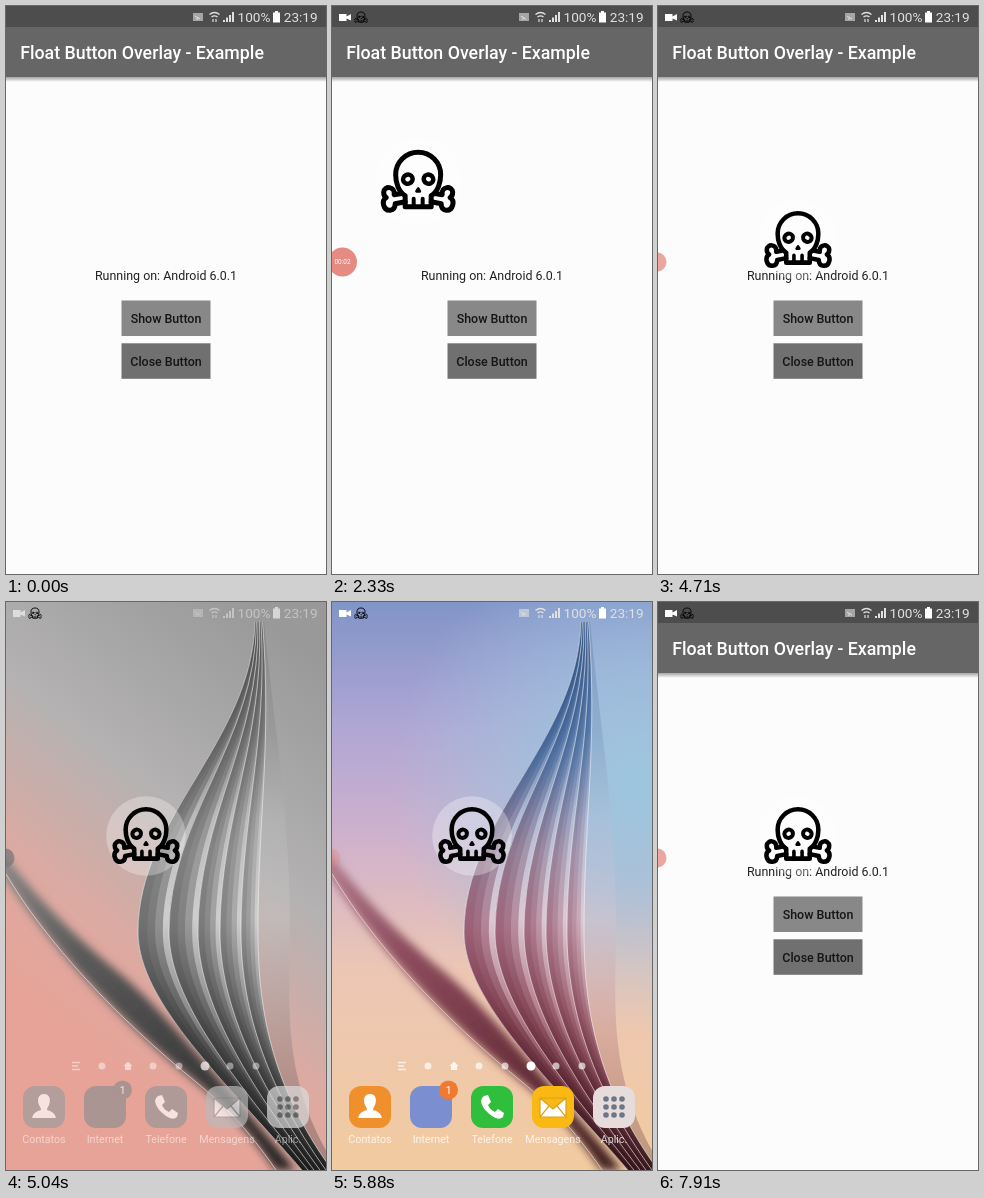
An HTML page that plays this animation: 320x568 px, repeating every 8000 ms.

```html
<!DOCTYPE html>
<html lang="en">
<head>
<meta charset="utf-8">
<title>Float button overlay</title>
<style>
  html, body { margin: 0; width: 100%; height: 100%; overflow: hidden; background: #000; }
  svg { display: block; width: 320px; height: 568px; font-family: Roboto, sans-serif; }
  .mid { text-anchor: middle; }
  .medium { font-weight: 500; }
</style>
</head>
<body>
<svg viewBox="0 0 320 568">
  <defs>
    <linearGradient id="sky" x2="0" y2="1">
      <stop offset="0" stop-color="#8194c8"/><stop offset=".22" stop-color="#b0a6d4"/>
      <stop offset=".42" stop-color="#d0b2cc"/><stop offset=".65" stop-color="#ecc6b4"/>
      <stop offset="1" stop-color="#f2cba0"/>
    </linearGradient>
    <radialGradient id="glow" gradientUnits="userSpaceOnUse" cx="310" cy="180" r="250">
      <stop offset="0" stop-color="#9cc6de"/><stop offset=".4" stop-color="#9cc4de" stop-opacity=".75"/>
      <stop offset="1" stop-color="#a4c4e0" stop-opacity="0"/>
    </radialGradient>
    <linearGradient id="dusk" gradientUnits="userSpaceOnUse" x1="320" y1="60" x2="40" y2="420">
      <stop offset="0" stop-color="#999"/><stop offset=".45" stop-color="#b4b2b2"/>
      <stop offset=".75" stop-color="#dcaaa2"/><stop offset="1" stop-color="#e8a398"/>
    </linearGradient>
    <linearGradient id="petal" gradientUnits="userSpaceOnUse" x1="0" y1="20" x2="0" y2="568">
      <stop offset="0" stop-color="#456796"/><stop offset=".2" stop-color="#6486b2"/>
      <stop offset=".36" stop-color="#b4bcd6"/><stop offset=".54" stop-color="#dcc8d4"/>
      <stop offset=".7" stop-color="#b88290"/><stop offset=".84" stop-color="#824452"/>
      <stop offset="1" stop-color="#421e24"/>
    </linearGradient>
    <linearGradient id="shade" gradientUnits="userSpaceOnUse" x1="0" y1="20" x2="0" y2="568">
      <stop offset="0" stop-color="#2c4c7e"/><stop offset=".25" stop-color="#48689a"/>
      <stop offset=".42" stop-color="#8a7088"/><stop offset=".56" stop-color="#985a70"/>
      <stop offset=".75" stop-color="#6e3040"/><stop offset="1" stop-color="#2e1216"/>
    </linearGradient>
    <linearGradient id="ribbon" gradientUnits="userSpaceOnUse" x1="0" y1="250" x2="270" y2="568">
      <stop offset="0" stop-color="#b07a8c"/><stop offset=".3" stop-color="#8c4c5e"/>
      <stop offset=".65" stop-color="#6e3340"/><stop offset="1" stop-color="#3a1a1c"/>
    </linearGradient>
    <linearGradient id="shadow" x2="0" y2="1">
      <stop offset="0" stop-opacity=".35"/><stop offset="1" stop-opacity="0"/>
    </linearGradient>
    <filter id="soft"><feGaussianBlur stdDeviation="4"/></filter>
    <g id="skull" fill="none" stroke="#000" stroke-width="5" stroke-linejoin="round" stroke-linecap="round">
      <path d="M-13 25V14C-20 10-22.5 0-22.5-7A22.5 22.5 0 0 1 22.5-7C22.5 0 20 10 13 14V25Z"/>
      <path d="M-4.5 17V25M4.5 17V25" stroke-width="4"/>
      <ellipse cx="-10.3" cy="-2.5" rx="4.8" ry="4.5" stroke-width="4.500" transform="rotate(-25 -10.3 -2.5)"/>
      <ellipse cx="10.3" cy="-2.5" rx="4.8" ry="4.5" stroke-width="4.500" transform="rotate(25 10.3 -2.5)"/>
      <path d="M0 7L-1.5 9.5H1.5Z" stroke-width="3"/>
      <path id="bone" d="M-18 12L-24 13C-23 4-34 4-34.5 10.5C-34.5 13-33.5 15-32 16C-37 19-35 29-28 28.5C-24 28-23 25-23 22L-13 20"/>
      <use href="#bone" transform="scale(-1 1)"/>
    </g>
  </defs>

  <g id="home">
    <g id="colorSky">
      <rect width="320" height="568" fill="url(#sky)"/>
      <rect width="320" height="568" fill="url(#glow)"/>
    </g>
    <rect id="greySky" width="320" height="568" fill="url(#dusk)"/>
    <g id="leaves">
      <path d="M-10 242C30 296 70 335 105 364C150 400 190 450 290 568H270C240 525 220 505 190 480C110 415 40 340-10 262Z" fill="url(#ribbon)" filter="url(#soft)"/>
      <path d="M0 272C40 340 110 415 190 480C220 505 240 525 270 568" fill="none" stroke="#f6e0d4" stroke-opacity=".7"/>
    </g>
    <g id="icons" fill="#fff">
      <path d="M66 460.5H74M66 464H72M66 467.5H74" stroke="#fff" stroke-opacity=".7" stroke-width="1.5"/>
      <path d="M117.500 464L122 459.500L126.500 464H125V468H119V464Z" opacity=".8"/>
    </g>
  </g>

  <g id="app">
    <rect id="page" width="320" height="568"/>
    <rect y="71" width="320" height="5" fill="url(#shadow)"/>
    <rect width="320" height="71" fill="#666"/>
    <rect width="320" height="21" fill="#4d4d4d"/>
    <text class="medium" x="14.200" y="52.500" font-size="17.780" fill="#fff">Float Button Overlay - Example</text>
    <text class="mid" x="160" y="274.300" font-size="12.440" fill="#222">Running on: Android 6.0.1</text>
    <rect x="115.500" y="294.500" width="89" height="35.500" fill="#888"/>
    <rect x="115.500" y="337.300" width="89" height="35.500" fill="#707070"/>
    <g class="mid medium" font-size="12.440" fill="#151515">
      <text x="160" y="317">Show Button</text>
      <text x="160" y="359.700">Close Button</text>
    </g>
  </g>

  <g id="status" fill="#e0e0e0" font-size="13.600">
    <path d="M187 7H197V15H187Z" opacity=".6"/>
    <path d="M189 10L194 13M190 13H192" stroke="#e0e0e0"/>
    <g fill="none" stroke="#e0e0e0" stroke-width="1.400">
      <path d="M203.500 8.500Q208.500 4.500 213.500 8.500M205.500 11Q208.500 8.700 211.500 11"/>
      <path d="M207 13V16M210 16V13" stroke-width="1.200"/>
    </g>
    <path d="M217 14H219V16H217ZM220 11.500H222V16H220ZM223 9H225V16H223ZM226 6H228V16H226Z"/>
    <text x="231.500" y="16">100%</text>
    <path d="M269 5H272V6.500H274V16.500H267V6.500H269Z" fill="#fff"/>
    <text x="277.800" y="16">23:19</text>
    <path id="camera" d="M7 8H14.500V10.500L19 8V14.500L14.500 12.500V15H7Z" fill="#fff"/>
  </g>
  <use id="badge" href="#skull" transform="translate(29 11.300) scale(.18)"/>

  <g id="timer">
    <circle id="disc" cy="256"/>
    <text id="clock" class="mid" y="258.300" font-size="6.500" fill="#fff"></text>
  </g>

  <g id="float">
    <circle r="44" fill="#fff" fill-opacity=".3"/>
    <use href="#skull"/>
  </g>
</svg>
<script>
const NS = 'http://www.w3.org/2000/svg';
const $ = id => document.getElementById(id);
const set = (el, attrs) => { for (const k in attrs) el.setAttribute(k, attrs[k]); };
const add = (parent, tag, attrs, text = '') => {
  const el = parent.appendChild(document.createElementNS(NS, tag));
  set(el, attrs);
  el.textContent = text;
};
const show = (id, on) => { $(id).style.display = on ? '' : 'none'; };
const ramp = (t, a, b) => Math.min(1, Math.max(0, (t - a) / (b - a)));
const mix = (a, b, p) => a + (b - a) * p;

// Wallpaper petals: each lies between two neighbouring edges;
// i runs from 0 (left edge) to 6 (right edge) and may be fractional
const widths = [132, 163, 192, 214, 235, 252, 284];
const edge = i => {
  const k = Math.floor(i), x = mix(widths[k], widths[k + 1] ?? 0, i - k) || widths[k];
  return [[249 + i * 1.5, 20], [246 + i * 4, 140], [x, 215], [x, 330],
          [x, 400], [x * .35 + 174, 480], [296 + i * 6, 568]];
};
const curve = ([p, ...rest]) => `${p}C${rest.join(' ')}`;
const between = (a, b) => `M${curve(edge(a))}L${curve(edge(b).reverse())}Z`;
const leaves = $('leaves');
for (let i = 0; i < 6; i++) {
  add(leaves, 'path', { d: between(i, i + 1), fill: 'url(#petal)', opacity: i < 5 ? 1 : .3 });
  if (i < 5) [.3, .55, .8].forEach(w =>
    add(leaves, 'path', { d: between(i, i + w), fill: 'url(#shade)', opacity: mix(.6, .28, i / 4) }));
  add(leaves, 'path', { d: 'M' + curve(edge(i)), fill: 'none', stroke: '#fff', 'stroke-opacity': .5 });
}

// Home screen shortcuts
const icons = $('icons');
[96, 147, 173, 199, 224, 250].forEach(x =>
  add(icons, 'circle', { cx: x, cy: 464, r: x === 199 ? 4.5 : 3.5, opacity: x === 199 ? 1 : .65 }));
[['Contatos', '#f0902c'], ['Internet', '#7b8fd0'], ['Telefone', '#2fbf3c'],
 ['Mensagens', '#f9b812'], ['Aplic.', '#e6dcdc']].forEach(([name, fill], i) => {
  const x = 38 + i * 61;
  add(icons, 'rect', { x: x - 21, y: 484, width: 42, height: 42, rx: 12, fill });
  add(icons, 'text', { x, y: 541, class: 'mid', 'font-size': 10.7, opacity: .8 }, name);
});
add(icons, 'path', { d: 'M38 492C32 492 31 498 33 503Q35 506 35 508Q27 510 26 516H50Q49 510 41 508Q41 506 43 503C45 498 44 492 38 492Z' });
add(icons, 'path', { d: 'M152 494L156 493L159 500L156 503Q158 508 163 510L166 507L172 511L171 515Q167 519 160 514Q150 507 149 499Q149 496 152 494Z' });
add(icons, 'path', { d: 'M208 496H234V515H208ZM208 496L221 507L234 496M208 515L217 504M234 515L225 504', stroke: '#dda018', 'stroke-width': 1.2 });
for (let i = 0; i < 9; i++)
  add(icons, 'circle', { cx: 274 + i % 3 * 8, cy: 497 + Math.floor(i / 3) * 8, r: 2.8, fill: '#6d7686' });
add(icons, 'circle', { cx: 116.5, cy: 488, r: 9.5, fill: '#f07a30' });
add(icons, 'text', { x: 116.5, y: 492, class: 'mid', 'font-size': 11 }, '1');

function drawFloat(t) {
  show('float', t >= 960);
  show('badge', t >= 960);
  const a = ramp(t, 2020, 2330), b = ramp(t, 2330, 2650);
  const x = mix(mix(36, 86, a), 140, b);
  const y = mix(mix(118, 175.5, a), 234, b);
  const size = t < 1030 ? .6 : t >= 2020 && t < 2950 ? 1 : .905;
  set($('float'), { transform: `translate(${x} ${y}) scale(${size})` });
}

function drawTimer(t, away) {
  show('timer', t >= 160);
  show('camera', t >= 160);
  const p = ramp(t, 960, 1230), tucked = t >= 3190;
  const x = tucked ? -1 : mix(18, 10.5, p);
  set($('disc'), { cx: x, r: tucked ? 9.5 : mix(18, 14.5, p), fill: away ? '#777' : '#e5857b' });
  set($('clock'), { x });
  $('clock').textContent = tucked ? '' : '00:0' + (t < 960 ? 0 : t < 2020 ? 1 : 2);
  set($('timer'), { opacity: tucked ? (t > 5480 && t < 6330 ? .3 : .72) : .95 });
}

function drawScreens(t) {
  const out = ramp(t, 4740, 4960), back = ramp(t, 5900, 6330);
  const opening = back > 0;
  const ease = 1 - (1 - back) ** 2;
  const scale = opening ? .85 + .15 * ease : 1 - .1 * out;
  const grey = t < 5480;
  set($('app'), {
    opacity: opening ? Math.min(1, back * 1.32) : 1 - out,
    transform: `translate(160 284) scale(${scale}) translate(-160 -284)`
  });
  set($('page'), { fill: opening && back < 1 ? '#e6d6d4' : '#fcfcfc' });
  show('home', out > 0 && back < 1);
  show('greySky', grey);
  show('colorSky', !grey);
  leaves.style.filter = icons.style.filter = grey ? 'grayscale(1)' : '';
  set(icons, { opacity: ramp(t, 4800, 5150) * (1 - ramp(t, 5900, 6100)) });
  const away = out === 1 && grey;
  set($('status'), { opacity: away ? .6 : 1 });
  return away;
}

function frame(now) {
  const t = now % 8000;
  drawTimer(t, drawScreens(t));
  drawFloat(t);
  requestAnimationFrame(frame);
}
frame(0);
</script>
</body>
</html>
```
